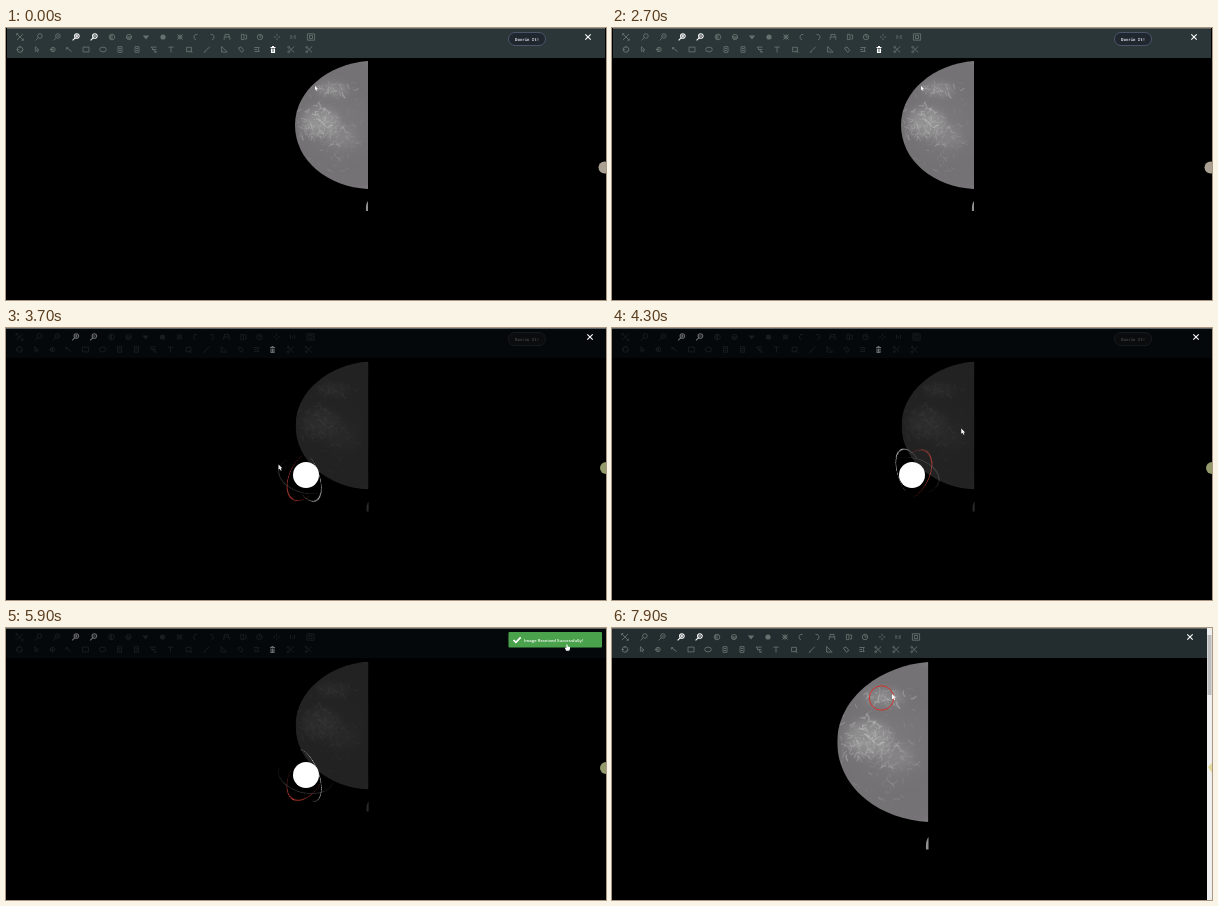
Recreate the animation shown at these times as an HTML page. Size 600 by 272 pixels, loop 8000 ms.

```html
<!DOCTYPE html>
<html lang="en">
<head>
<meta charset="utf-8">
<title>Scan review</title>
<style>
  html, body { margin: 0; width: 100%; height: 100%; overflow: hidden; background: #000; }
  #stage { position: relative; width: 600px; height: 272px; overflow: hidden; background: #000; }
  svg { position: absolute; inset: 0; }
  .icon { fill: none; stroke: #66716f; stroke-width: .9; }
  .solid { fill: #66716f; stroke: none; }
  .bright .icon { stroke: #fff; stroke-width: 1.1; }
  .label { font: 700 4px "DejaVu Sans Mono", monospace; fill: #dfe4e8; }
  .note { font: 600 4.25px "Open Sans", sans-serif; fill: #fff; }
  #rings { position: absolute; left: 271.5px; top: 119px; width: 56px; height: 56px; perspective: 700px; }
  #rings div { position: absolute; inset: 0; box-sizing: border-box; border-radius: 50%; }
</style>
</head>
<body>
<div id="stage">
  <svg width="600" height="272" viewBox="0 0 600 272">
    <defs>
      <radialGradient id="tissue" gradientUnits="userSpaceOnUse" cx="-28" cy="64" r="72">
        <stop offset="0" stop-color="#7b797b"/>
        <stop offset=".6" stop-color="#737173"/>
        <stop offset=".9" stop-color="#757375"/>
        <stop offset="1" stop-color="#858385"/>
      </radialGradient>
      <filter id="soft" x="-50%" y="-50%" width="200%" height="200%"><feGaussianBlur stdDeviation="4"/></filter>
      <filter id="fine"><feGaussianBlur stdDeviation=".6"/></filter>
      <clipPath id="outline"><path d="M0 0C-40 3-73 30-73 64C-73 100-40 126 0 128Z"/></clipPath>
    </defs>

    <g id="scan">
      <g clip-path="url(#outline)">
        <rect x="-74" width="74" height="128" fill="url(#tissue)"/>
        <g fill="#b4b4b4" filter="url(#soft)">
          <ellipse cx="-48" cy="61" rx="18" ry="14" opacity=".42"/>
          <ellipse cx="-36" cy="28" rx="16" ry="6" opacity=".35"/>
          <ellipse cx="-26" cy="76" rx="14" ry="10" opacity=".2"/>
        </g>
        <g id="fibres" fill="none" stroke="#d0d0d0" stroke-linecap="round" filter="url(#fine)"/>
      </g>
      <path d="M0 140Q-2.6 143-2 150H0Z" fill="#909090"/>
    </g>
    <circle id="lesion" cx="269.5" cy="70" r="12.2" fill="none" stroke="#d3302c"/>

    <rect id="bar" y="0" height="30"/>
    <g id="button">
      <rect x="502.5" y="4.5" width="37" height="13" rx="6.5" fill="#20272f" stroke="#4b5568"/>
      <text class="label" x="509" y="12.6">Dovrin It!</text>
    </g>
    <g id="tools"></g>
    <rect id="shade" width="600" height="272" opacity=".7"/>
    <rect id="edge" y="0" height="1" fill="#5c6466"/>
    <g id="lit" class="bright"></g>
    <path id="close" d="M-2.7-2.7L2.7 2.7M2.7-2.7L-2.7 2.7" stroke="#fff" stroke-width="1.1"/>
    <circle id="chip" r="6"/>
    <g id="scroll">
      <rect x="595" width="5" height="272" fill="#efefef"/>
      <rect x="595.5" y="7" width="4" height="60" fill="#bdbdbd"/>
      <path d="M596 139l4-4v10z" fill="#e3d99a"/>
    </g>
    <circle id="mark" cx="300" cy="147" r="13" fill="#fff"/>
    <g id="toast">
      <rect x="502.5" y="4" width="93.5" height="15.5" rx="1" fill="#4aa34c"/>
      <path d="M507.5 12l2.4 2.4l4.8-5" fill="none" stroke="#fff" stroke-width="1.7"/>
      <text class="note" x="518" y="13.5">Image Received Successfully!</text>
    </g>
    <path id="arrow" d="M0 0V5.2L1.3 4.2L2.3 6.2L3.1 5.8L2.2 3.8H3.8Z" fill="#fff"/>
    <path id="hand" d="M-.6 0H.5V2L3 2.6V4.6L2.2 6.2H-.8L-2.2 3.6L-1.6 3L-.6 3.8Z" fill="#fff"/>
  </svg>
  <div id="rings"></div>
</div>
<script>
const LOOP = 8000, STEP = 100, CUT = 3000, DONE = 6600;
const NS = "http://www.w3.org/2000/svg";
const $ = id => document.getElementById(id);

function add(parent, name, attrs) {
  const el = document.createElementNS(NS, name);
  for (const key in attrs) el.setAttribute(key, attrs[key]);
  return parent.appendChild(el);
}

const ring = r => `M${-r} 0a${r} ${r} 0 1 0 ${2 * r} 0a${r} ${r} 0 1 0 ${-2 * r} 0`;
const box = (w, h) => `M${-w} ${-h}H${w}V${h}H${-w}Z`;
const lens = "M-1.4-1a2.3 2.3 0 1 0 4.6 0a2.3 2.3 0 1 0-4.6 0M-.8.8L-3.4 3.4";
const cross = "M-3-3L3 3M3-3L-3 3";
const page = box(2, 2.8) + "M-1-1H1M-1 1H1";
const scissors = "M-1.6-1.6L3.2 3M-1.6 1.6L3.2-3M-3.2-2.2a.9.9 0 1 0 1.8 0a.9.9 0 1 0-1.8 0M-3.2 2.2a.9.9 0 1 0 1.8 0a.9.9 0 1 0-1.8 0";
const trash = "M-2.5-2H2.5M-1-3H1M-1.5-1V3H1.5V-1M0-1V3";

// A leading "*" marks a filled icon, "!" a highlighted one.
const rows = [
  { y: 9, xs: [14, 33, 51, 70, 88, 106, 123, 140, 157, 174, 190, 206, 221, 238, 254, 271, 287, 305],
    icons: [cross + "M-3.4-1.6V-3.4H-1.6M1.6 3.4H3.4V1.6", lens, lens + "M-.3-1H2", "!" + lens + "M-.3-1H2M.9-2.2V.2",
      "!" + lens + "M-.3-1H2", ring(2.8) + "M0-2.8V2.8M-1.4-2V2", ring(2.6) + "M-2.6 0H2.6M-2 1.2H2", "*M-3.2-1.6H3.2L0 2.4Z",
      "*" + ring(2.6), ring(2) + "M-2.6-2.6L2.6 2.6M2.6-2.6L-2.6 2.6", "M1.5-2.6A2.7 2.7 0 0 0 0 2.8",
      "M-1.5-2.6A2.7 2.7 0 0 1 0 2.8", "M-2.8 2.8V0H2.8V2.8M-2 0V-2.6H2V0", "M-2.6-2.6V2.6H0V-2.6ZM1-2H2.6V2H1",
      ring(2.7) + "M0-2V0H1.6", "M-3.2 0H-1.2M1.2 0H3.2M0-3.2V-1.2M0 1.2V3.2", "M-2-2V2M2-2V2M0-1V-.2M0 .8V1.6", box(3.6, 3.2) + box(1.5, 1.6)] },
  { y: 21.5, xs: [14, 31, 47, 63, 80, 97, 114, 131, 148, 165, 183, 201, 218, 235, 251, 267, 285, 303],
    icons: [ring(2.8) + "M-3.3 0H-1M1 2L3 0M-1-2L1-3", "M-1.6-2.8V2L-.2.8L1 3M-1.6-2.8L2 .6H0", ring(2.2) + "M-3.2 0H0M0-2.2V2.2",
      "M-2.6-1.8L2.6 2M-2.6-1.8H-.6M-2.6-1.8V0", box(3, 2.4), "M-3.3 0a3.3 2.4 0 1 0 6.6 0a3.3 2.4 0 1 0-6.6 0", page, page,
      "M-3-2.4H2.6M-2 0H2.4M0 2.4H3M-3-2.4L2 3", "M-2.6-2.4H2.6M0-2.4V3", box(2.4, 2.2) + "M1 1L3.4 3.4", "M-2.8 2.8L2.8-2.8M-2.8 2.8L-1.2 2.2",
      "M-2.4-3V2.6H3.2ZM-1 .8V1.2", "M-2.6-1.4L0-2.6L2.8 1L.6 2.8Z", "M-2.6-2H2.6M-2.6 0H0M-2.6 2H2.6M1.6-2V2", "!" + trash, scissors, scissors] }
];

let bin;
for (const { y, xs, icons } of rows) {
  icons.forEach((code, i) => {
    const flag = code[0] === "M" ? "" : code[0];
    const d = flag ? code.slice(1) : code;
    const el = add(flag === "!" ? $("lit") : $("tools"), "path",
      { d, class: flag === "*" ? "solid" : "icon", transform: `translate(${xs[i]} ${y})` });
    if (d === trash) bin = el;
  });
}
const spare = add($("tools"), "path", { d: scissors, class: "icon", transform: "translate(267 21.5)" });

// Soft seeded strands inside the scan, running in all directions.
let seed = 11;
const rnd = () => (seed = seed * 16807 % 2147483647) / 2147483647;
const spread = w => (rnd() + rnd() - 1) * w;
function strands(n, cx, cy, w, h, opacity) {
  for (let i = 0; i < n; i++) {
    const a = rnd() * 2 * Math.PI, len = 2 + rnd() * 4;
    const dx = len * Math.cos(a), dy = len * Math.sin(a);
    add($("fibres"), "path", {
      d: `M${cx + spread(w)} ${cy + spread(h)}q${dx / 2 - dy / 4} ${dy / 2 + dx / 4} ${dx} ${dy}`,
      "stroke-width": .5 + rnd(), opacity: opacity * (.4 + rnd() * .6)
    });
  }
}
strands(90, -48, 61, 24, 22, .36);
strands(34, -37, 28, 24, 8, .36);
strands(45, -32, 76, 30, 28, .24);
strands(70, -34, 66, 38, 60, .13);

// Tilt, colour, lit border and start angle of each orbit.
const orbits = [
  [35, -45, "#e8493f", 1.8, 80],
  [50, 10, "rgba(150,150,150,.45)", 1, 50],
  [35, 55, "#f4f4f4", 1.9, -75]
].map(([ax, ay, color, width, start]) => {
  const el = $("rings").appendChild(document.createElement("div"));
  el.style.borderBottom = `${width}px solid ${color}`;
  return { el, ax, ay, start };
});

const path = [
  [0, 309, 58], [2900, 309, 58], [3700, 272.5, 136.5], [3900, 272.5, 136.5],
  [5000, 528, 17], [5900, 561, 16.5], [6599, 561, 16.5], [DONE, 332, 94], [7400, 280, 66], [LOOP, 280, 66]
];
const ease = p => p * p * (3 - 2 * p);

function pointer(t) {
  if (t > 7400) {
    const a = (t - 7400) / 500 * 2 * Math.PI;
    return [268 + 12 * Math.cos(a), 66 - 8 * Math.sin(a)];
  }
  const i = path.findIndex(k => k[0] > t);
  const [t0, x0, y0] = path[i - 1], [t1, x1, y1] = path[i];
  const p = ease((t - t0) / (t1 - t0));
  return [x0 + (x1 - x0) * p, y0 + (y1 - y0) * p];
}

const show = (el, on) => el.style.display = on ? "" : "none";
const place = (el, x, y, s = 1) => el.setAttribute("transform", `translate(${x} ${y}) scale(${s})`);
const set = (el, attrs) => { for (const k in attrs) el.setAttribute(k, attrs[k]); };

function render(t) {
  const done = t >= DONE, busy = t >= CUT && !done, first = t < CUT;

  if (done) place($("scan"), 316.5, 34, 1.25);
  else place($("scan"), busy ? 362.6 : 362, busy ? 33.5 : 33);
  const bar = { x: first ? 1 : 0, width: first ? 598 : done ? 595 : 600 };
  set($("bar"), { ...bar, fill: done ? "#232d2f" : busy ? "#0c1c24" : "#2b3639" });
  set($("edge"), bar);
  const shift = first ? 0 : busy ? -.5 : -1;
  place($("tools"), shift, 0);
  place($("lit"), shift, 0);
  $("tools").style.opacity = busy ? .8 : 1;
  $("lit").style.opacity = busy ? .4 : 1;
  place($("close"), first ? 582 : done ? 578 : 584, 9);
  set($("chip"), { cx: first ? 598.5 : 600, cy: first ? 139.5 : 140, fill: first ? "#aaa194" : "#959a6c" });

  show($("lesion"), done);
  show($("scroll"), done);
  show(spare, done);
  show(bin, !done);
  show($("button"), !done);
  show($("chip"), !done);
  for (const id of ["shade", "mark", "rings"]) show($(id), busy);

  const fade = Math.min(1, Math.max(0, (t - 4400) / 300));
  show($("toast"), busy && fade > 0);
  $("toast").style.opacity = fade;

  const spin = (t - 3700) * .31;
  for (const { el, ax, ay, start } of orbits)
    el.style.transform = `rotateX(${ax}deg) rotateY(${ay}deg) rotateZ(${start + spin}deg)`;

  const [x, y] = pointer(t);
  const overToast = busy && x > 502 && y < 20;
  show($("hand"), overToast);
  show($("arrow"), !overToast);
  place($("hand"), x, y);
  place($("arrow"), x, y, first ? .8 : 1);
}

const origin = performance.now();
function tick() {
  const t = (performance.now() - origin) % LOOP;
  render(Math.floor(t / STEP) * STEP);
  requestAnimationFrame(tick);
}
tick();
</script>
</body>
</html>
```
